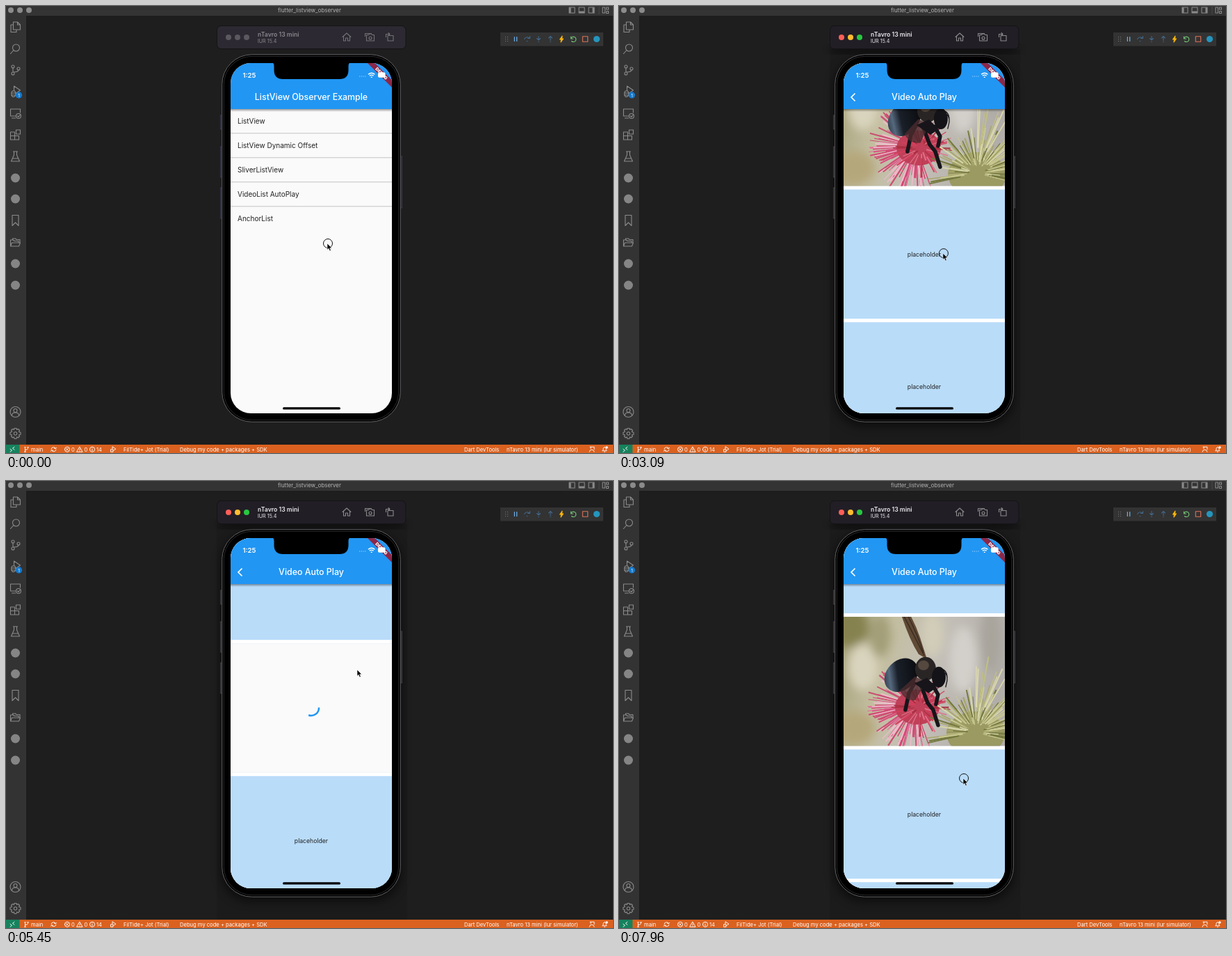
An HTML page for the animation above (8 s loop, 873 by 642 pixels).

```html
<!DOCTYPE html>
<html lang="en">
<head>
<meta charset="utf-8">
<title>Video list</title>
<style>
html, body { margin: 0; width: 100%; height: 100%; overflow: hidden; background: #1e1e1e; }
svg { display: block; width: 873px; height: 642px; font-family: Inter, Roboto, sans-serif; }
.ic { fill: none; stroke: #8a8a8a; stroke-width: 1.1; stroke-linejoin: round; stroke-linecap: round; }
.st { font-size: 7.6px; fill: #fff; }
.title { font-size: 12.4px; font-weight: 500; fill: #fff; text-anchor: middle; }
.row { font-size: 10px; fill: #222; }
.ph { font-size: 8.66px; fill: #222; text-anchor: middle; }
</style>
</head>
<body>
<svg viewBox="0 0 873 642">
  <defs>
    <clipPath id="screen"><rect x="323" y="82" width="232" height="503" rx="29"/></clipPath>
    <clipPath id="frame"><rect width="232" height="185.6"/></clipPath>
    <linearGradient id="shade" x2="0" y2="1">
      <stop stop-opacity=".38"/><stop offset="1" stop-opacity="0"/>
    </linearGradient>
    <linearGradient id="meadow" x2="1" y2=".2">
      <stop stop-color="#a29e76"/><stop offset=".3" stop-color="#c3bea0"/>
      <stop offset=".6" stop-color="#c4c0b8"/><stop offset="1" stop-color="#b1ada9"/>
    </linearGradient>
    <linearGradient id="shell" x2="1" y2=".6">
      <stop stop-color="#151a22"/><stop offset=".3" stop-color="#56697e"/>
      <stop offset=".5" stop-color="#1a2029"/><stop offset="1" stop-color="#0b0c10"/>
    </linearGradient>
    <filter id="soft" x="-40%" y="-40%" width="180%" height="180%"><feGaussianBlur stdDeviation="7"/></filter>
  </defs>

  <rect width="873" height="642" fill="#1e1e1e"/>
  <rect width="873" height="14" fill="#343435"/>
  <rect y="14" width="29" height="616" fill="#333"/>
  <g fill="#8b8b8b"><circle cx="7" cy="6" r="4"/><circle cx="20" cy="6" r="4"/><circle cx="33" cy="6" r="4"/></g>
  <text x="436.5" y="8.8" font-size="7.9" fill="#b4b4b4" text-anchor="middle">flutter_listview_observer</text>
  <g id="side"></g>
  <g id="tools"></g>

  <rect y="630" width="873" height="12" fill="#da611f"/>
  <rect y="630" width="19.5" height="12" fill="#16825d"/>
  <g id="status"></g>

  <g id="glow">
    <rect x="303" y="62" width="274" height="568" opacity=".1"/>
    <rect x="309" y="74" width="260" height="530" rx="42" filter="url(#soft)" opacity=".5"/>
    <rect x="306" y="58" width="266" height="8" filter="url(#soft)" opacity=".7"/>
  </g>
  <rect id="bar" x="303.5" y="28.5" width="271.5" height="33" rx="6" stroke="#111" stroke-width=".8"/>
  <g id="lights"><circle cx="320" cy="45" r="4"/><circle cx="333" cy="45" r="4"/><circle cx="346" cy="45" r="4"/></g>
  <g id="names">
    <text x="362" y="44.3" font-size="8.7" font-weight="600">nTavro 13 mini</text>
    <text x="362" y="53.2" font-size="7.2">lUR 15.4</text>
  </g>
  <g id="simIcons" class="ic"></g>

  <g id="keys" stroke-width=".7">
    <rect x="308.3" y="157" width="3" height="20"/><rect x="308.3" y="202" width="3" height="44"/>
    <rect x="308.3" y="261" width="3" height="44"/><rect x="566.7" y="216" width="3" height="74"/>
  </g>
  <rect x="310.7" y="69.7" width="256.6" height="527.6" rx="43" stroke="#626265"/>
  <rect x="313.3" y="72.3" width="251.4" height="522.4" rx="40.5" stroke="#29292b"/>

  <g clip-path="url(#screen)">
    <g id="home">
      <rect x="323" y="82" width="232" height="503" fill="#fafafa"/>
      <g id="rows"></g>
      <rect x="323" y="148" width="232" height="4" fill="url(#shade)"/>
      <rect x="323" y="82" width="232" height="66" fill="#2196f3"/>
      <text class="title" x="439" y="135.2">ListView Observer Example</text>
    </g>
    <g id="page">
      <rect x="323" y="82" width="232" height="503" fill="#fff"/>
      <g id="scroll">
        <g id="items"></g>
        <g id="cell">
          <rect width="232" height="185.6" fill="#fafafa"/>
          <path id="spin" fill="none" stroke="#2196f3" stroke-width="2.5"/>
          <g id="video" clip-path="url(#frame)"></g>
        </g>
      </g>
      <rect x="323" y="148" width="232" height="4" fill="url(#shade)"/>
      <rect x="323" y="82" width="232" height="66" fill="#2196f3"/>
      <path d="M339.5 125.5l-5.5 5.5 5.5 5.5" fill="none" stroke="#fff" stroke-width="1.7"/>
      <text class="title" x="439" y="135.2">Video Auto Play</text>
    </g>
    <g transform="translate(555 82) rotate(45)">
      <rect x="-26" y="17.3" width="52" height="7.5" fill="#8c2748"/>
    </g>
    <rect x="535" y="95.3" width="10.5" height="7.5" rx="2" fill="#fff"/>
    <text transform="translate(555 82) rotate(45)" y="23.4" font-size="6.3" font-weight="900" fill="#fff" text-anchor="middle">DEBUG</text>
    <text x="340.5" y="102.8" font-size="9.6" font-weight="600" fill="#fff">1:25</text>
    <path d="M508 101h10" stroke="#a9d5fa" stroke-width="1.2" stroke-dasharray="1.2 1.5"/>
    <g fill="none" stroke="#fff" stroke-width="1.4">
      <path d="M521 98.3q4.7-4 9.4 0M522.8 100.3q2.9-2.4 5.8 0"/><path d="M524.8 102.2h1.8"/>
    </g>
    <rect x="398" y="576.3" width="83" height="3.3" rx="1.65"/>
  </g>
  <path d="M381 81q4.5 0 4.5 5v6q0 13 13 13h81q13 0 13-13v-6q0-5 4.5-5z"/>

  <g id="cursor">
    <circle id="press" cx="1" r="6.5" fill="none" stroke="#111"/>
    <path d="M0 0v9.2l2.1-1.9 1.5 3.5 1.7-.7-1.5-3.4h2.9z" stroke="#fff" stroke-width=".6"/>
  </g>
</svg>

<script>
const $ = id => document.getElementById(id);
const LOOP = 8000, FIRST = 140, STEP = 147.2;
const PITCH = 190.6, HEIGHT = 185.6;

const icon = (x, y, d, extra = '') => `<path class="ic" transform="translate(${x} ${y})" d="${d}" ${extra}/>`;
const disc = (x, y, r, fill) => `<circle cx="${x}" cy="${y}" r="${r}" fill="${fill}"/>`;
const ring = r => `M${-r} 0a${r} ${r} 0 1 0 ${2 * r} 0a${r} ${r} 0 1 0 ${-2 * r} 0`;

// Editor chrome
$('side').innerHTML = [
  [30, 'M-3-7h6l4 4v7h-10zM-3-3h-3.5v10.5h8v-3.5M3-7v4h4'],
  [61, 'M-2.5 2.5l-4.5 5M-2.5 2.5a5 5 0 1 1 7 0a5 5 0 0 1-7 0'],
  [92, 'M-3.5-3v6M-5.5-5a2 2 0 1 0 4 0a2 2 0 1 0-4 0M-5.5 5a2 2 0 1 0 4 0a2 2 0 1 0-4 0M2.5-2a2 2 0 1 0 4 0a2 2 0 1 0-4 0M4.5 0q0 3-8 3'],
  [123, 'M-2-2v-6l9 6-7 5M-6 2h7M-6 5h7M-4-1h3q2 2 1.5 5t-3 3.5-3-3.5 1.5-5'],
  [154, 'M0 4h-7v-10h14v5M-5 7h5M1 4a3.5 3.5 0 1 0 7 0a3.5 3.5 0 1 0-7 0M3 4l1.5 1.5 2-3'],
  [185, 'M-7-4h6v11h-6zM-7 1.5h12v5.5h-6M5 1.5v5.5M1-7h6v6h-6z'],
  [216, 'M-3-7h6M-2-7v5l-4 9h12l-4-9v-5M-4 3h8'],
  [308, 'M-4.5-7.5h9v15l-4.5-4.5-4.5 4.5z'],
  [340, 'M-7 5v-9h4l1.5 1.5h6v2.5M-7 5l2-5h12l-2 5zM-4-4v-2h4l1.5 1.5h5v5'],
  [583, ring(7.5) + 'M-2.5-2a2.5 2.5 0 1 0 5 0a2.5 2.5 0 1 0-5 0M-5 5q0-4 5-4t5 4'],
  [614, ring(2.2) + 'M-1.5-7.5h3l.5 2 2-1 2 2-1 2 2.5 1v3l-2.5.5 1 2-2 2-2-1-.5 2.5h-3l-.5-2.5-2 1-2-2 1-2-2.5-.5v-3l2.5-1-1-2 2-2 2 1z']
].map(([y, d]) => icon(13.5, y, d)).join('')
  + [247, 277, 370, 401].map(y => disc(13.5, y, 6.5, '#858585')).join('')
  + disc(18.5, 128, 4.7, '#1378cc')
  + '<text x="18.5" y="130.5" font-size="6.5" fill="#fff" text-anchor="middle">1</text>';

const tool = (x, d, color, fill = 'none') => icon(x, 47.5, d, `style="stroke:${color};fill:${fill}"`);
$('tools').innerHTML = '<rect x="711" y="38" width="148" height="19.5" fill="#333"/>'
  + tool(720, 'M-1.5-3v0M1.5-3v0M-1.5 0v0M1.5 0v0M-1.5 3v0M1.5 3v0', '#888')
  + tool(733, 'M-1.7-3v6M1.7-3v6', '#75beff')
  + tool(749.5, 'M-4 0q3-5 8-1M4-4v3h-3M-.5 3h1', '#41678a')
  + tool(766, 'M0-4v5M-2.5-1l2.5 2.5 2.5-2.5M-.3 4h.6', '#41678a')
  + tool(783, 'M0 2v-6M-2.5-1.5l2.5-2.5 2.5 2.5M-.3 4h.6', '#41678a')
  + tool(799, 'M1-4.5l-3.5 5h2l-.5 4 3.5-5h-2z', '#fcb50a', '#fcb50a')
  + tool(816, 'M-3.5-3.5v3h3M-3.5-.5a3.7 3.7 0 1 1 1 3.5', '#75c878')
  + tool(833, 'M-3.7-3.7h7.4v7.4h-7.4z', '#e0735a')
  + disc(849.5, 47.5, 4.6, '#2595bd')
  + icon(814, 6, 'M-4-4h8v8h-8zM-3-3v6M-2-3v6')
  + icon(828, 6, 'M-4-4h8v8h-8zM-3 2h6M-3 3h6')
  + icon(842, 6, 'M-4-4h8v8h-8zM3-3v6M2-3v6')
  + '<path d="M853 1v11" stroke="#555" stroke-width=".7"/>'
  + icon(862, 6, 'M-4-4h3.5v8h-3.5zM1.5-4h3v3h-3zM1.5 1.5h3v3h-3z');

const white = 'style="stroke:#fff;stroke-width:.9"';
$('status').innerHTML = [
  [36, 'main'], [94, '0'], [112.5, '0'], [130, '14'], [169, 'FilTide+ Jot (Trial)'],
  [250, 'Debug my code + packages + SDK'], [659, 'Dart DevTools'], [720, 'nTavro 13 mini (lur simulator)']
].map(([x, s]) => `<text class="st" x="${x}" y="639.7">${s}</text>`).join('')
  + [
    [9, 'M-3-.5l2.5 2-2.5 2M3-3.5l-2.5 2 2.5 2'],
    [29.5, 'M-2-2v5M-3-3h2M2-2.5v1q0 2-4 2.5M1-3h2M-3 3.5h2'],
    [68.5, 'M-3.5-.5a3.5 3 0 0 1 6.5-1M3.5.5a3.5 3 0 0 1-6.5 1M4-2.5l-1 1.5-2-.5M-4 2.5l1-1.5 2 .5'],
    [88, ring(3.6) + 'M-1.5-1.5l3 3M1.5-1.5l-3 3'],
    [106, 'M0-3.5l4 7h-8zM0-1v2M0 2.3v.1'],
    [124, ring(3.6) + 'M0-.5v2.5M0-2v.1'],
    [154, 'M-1-1v-3l5 3.5-4 2.5M-3 0h3v3.5h-3z'],
    [842, 'M-3 3.5q.5-3 3.5-3t3.5 3M-2-3.5h6v3.5M-1-1v-2.5'],
    [861, 'M-3 2h6l-1-1.5v-2q-2-3.5-4 0v2zM-.5 3.5h1']
  ].map(([x, d]) => icon(x, 636.8, d, white)).join('')
  + disc(864, 634, 1.7, '#fff');

$('simIcons').innerHTML = [
  [490, 'M-6 0l6-5.5 6 5.5M-4.5-1v6.5h3v-4h3v4h3v-6.5'],
  [522.5, 'M-6-1v-4h9M-4-3h3l1-1.5h3l1 1.5h3v8.5h-11zM-.5 1.5a2 2 0 1 0 4 0a2 2 0 1 0-4 0'],
  [552, 'M-3-2h8v7.5h-8zM-5.5 0v-4h5M-2-6l2 2-2 2']
].map(([x, d]) => icon(x, 44.5, d)).join('');

// App content
$('rows').innerHTML = ['ListView', 'ListView Dynamic Offset', 'SliverListView', 'VideoList AutoPlay', 'AnchorList']
  .map((s, i) => `<text class="row" x="333" y="${169 + i * 35}">${s}</text>`
    + (i ? `<path d="M323 ${147.8 + i * 35}h232" stroke="#c3c3c3"/>` : '')).join('');

$('items').innerHTML = [0, 1, 2, 3, 4].map(i => `<g transform="translate(0 ${i * PITCH})">
  <rect width="232" height="${HEIGHT}" fill="#b9dcf9"/><text class="ph" x="116" y="96">placeholder</text></g>`).join('');

let seed = 7;
const rnd = (a, b) => a + (b - a) * ((seed = seed * 16807 % 2147483647) / 2147483647);
function spray(n, x, y, from, to, near, far, colors) {
  let out = '';
  for (let i = 0; i < n; i++) {
    const a = rnd(from, to) * Math.PI / 180, r = rnd(near, far);
    const at = k => `${(x + Math.cos(a) * k).toFixed(1)} ${(y + Math.sin(a) * k).toFixed(1)}`;
    out += `<path d="M${at(r * .35)}L${at(r)}" stroke="${colors[i % colors.length]}" stroke-width="${rnd(1, 2.2).toFixed(1)}"/>`;
  }
  return out;
}
$('video').innerHTML = `<rect width="232" height="186" fill="url(#meadow)"/>
  <g filter="url(#soft)">
    <ellipse cx="10" cy="15" rx="26" ry="30" fill="#86824f"/><ellipse cx="28" cy="72" rx="22" ry="34" fill="#d9d4bd"/>
    <ellipse cx="52" cy="28" rx="16" ry="30" fill="#a39f78"/><ellipse cx="128" cy="25" rx="16" ry="32" fill="#d2cdb8"/>
    <ellipse cx="172" cy="62" rx="20" ry="48" fill="#d3d0cb"/><ellipse cx="16" cy="160" rx="30" ry="25" fill="#b5a77b"/>
    <ellipse cx="212" cy="30" rx="14" ry="50" fill="#a8a49c"/>
  </g>
  <g id="plants">
    ${spray(100, 100, 125, 70, 240, 40, 70, ['#e0709a', '#d44a76', '#eebccb', '#c94f70'])}
    <ellipse cx="104" cy="128" rx="32" ry="25" fill="#bf4058"/>
    ${spray(60, 108, 128, 0, 360, 18, 46, ['#a82c3e', '#df7088', '#d23f5c'])}
    <ellipse cx="188" cy="166" rx="42" ry="32" fill="#9a9a62"/>
    ${spray(95, 188, 164, 165, 375, 30, 72, ['#d6d6aa', '#a7a66a', '#c9c891', '#74793f'])}
    ${spray(9, 188, 158, 270, 325, 78, 105, ['#dcd9ac', '#c0bf84'])}
  </g>
  <g id="bee">
    <g fill="none" stroke="#17151a" stroke-linecap="round" stroke-linejoin="round" stroke-width="5.5">
      <path d="M96 96l-8 14-5 24M106 100l9 24 8 10 7 22M122 98l8 14-3 14"/>
      <path d="M138 80q6 2 5 12l-2 9M134 75q10 2 9 16" stroke-width="1.3"/>
    </g>
    <g id="body">
      <path d="M76-6l12 0q10 18 16 36l10 31-12-7q-14-22-26-60z" fill="#604a35"/>
      <path d="M80-2q14 26 30 58M85-4q14 26 24 56" fill="none" stroke="#3b2c22" stroke-width="1.5"/>
      <ellipse cx="77" cy="84" rx="27" ry="21" transform="rotate(-45 77 84)" fill="url(#shell)"/>
      <path d="M75 106l22-20 16 8-16 26q-14 2-22-14z" fill="#4a2b2d" opacity=".8"/>
    </g>
    <ellipse cx="112" cy="75" rx="15" ry="17" fill="#2a2525"/>
    <ellipse cx="109" cy="70" rx="8" ry="7" fill="#54483f"/>
    <ellipse cx="131" cy="87" rx="10" ry="15" fill="#141317"/>
    <path d="M96 96l18-8 14 14-12 8z" fill="#17151a"/>
  </g>`;

// Timeline: rows of [time, ...values], linear in between
function track(rows, t) {
  let i = rows.findIndex(r => r[0] > t);
  if (i < 0) return rows[rows.length - 1].slice(1);
  if (!i) return rows[0].slice(1);
  const a = rows[i - 1], b = rows[i], k = (t - a[0]) / (b[0] - a[0]);
  return a.slice(1).map((v, j) => v + (b[j + 1] - v) * k);
}

const OFFSET = [[2680, 0], [2850, 30], [3050, 72], [3250, 87], [3450, 90.6], [4870, 90.6], [4997, 172.6],
  [5144, 257.6], [5295, 284], [5445, 296], [5600, 299.2], [6560, 299.2], [6760, 250], [6911, 208.6],
  [7060, 170], [7210, 150], [7350, 144], [7500, 143.1]];
const POINTER = [[0, 462, 341], [400, 462, 341], [900, 462, 271], [1250, 462, 271], [1900, 462, 450],
  [2600, 462, 450], [3100, 466, 352], [3350, 466, 350], [3950, 488, 472], [4400, 488, 472], [4870, 491, 462],
  [4997, 494, 365], [5144, 500, 282], [5300, 505, 271], [6450, 505, 271], [6911, 494, 395],
  [7060, 494, 432], [7400, 494, 440], [7800, 495, 427]];
const PRESS = [[0, 280], [1020, 1250], [2640, 3200], [4860, 5140], [6480, 7000], [7780, 8000]];
// [load time, item, video start]
const PLAY = [[0, 0, 2000], [3150, 1, 3500], [5140, 2, 5850], [6880, 1, 7090]];
// video time, bee x, y, body turn, plants x, y
const POSE = [[200, 0, 0, 0, 0, 0], [620, 3, -7, 0, 0, -3], [860, 6, 0, 0, 2, 2], [1490, 14, 6, -15, 8, 5]];

const move = (id, x, y) => $(id).setAttribute('transform', `translate(${x} ${y})`);
const show = (id, on) => $(id).setAttribute('visibility', on ? 'inherit' : 'hidden');

function windowState(active) {
  show('glow', active);
  $('bar').setAttribute('fill', active ? '#221e26' : '#2c2932');
  $('names').setAttribute('fill', active ? '#e8e6ea' : '#89868d');
  $('simIcons').setAttribute('opacity', active ? 1 : .75);
  $('keys').setAttribute('fill', active ? '#2b2b2d' : '#272536');
  $('keys').setAttribute('stroke', active ? '#48484a' : '#454258');
  const colors = active ? ['#fe5f57', '#febc2e', '#28c840'] : Array(3).fill('#5b585f');
  [...$('lights').children].forEach((c, i) => c.setAttribute('fill', colors[i]));
}

function spinner(age) {
  const sweep = .22 + 4.2 * Math.sin(Math.min(age, 1333) / 1333 * Math.PI) ** 2;
  const start = -1.25 + age * .004, end = start + sweep;
  const pt = a => `${116 + 11 * Math.cos(a)} ${92.8 + 11 * Math.sin(a)}`;
  $('spin').setAttribute('d', `M${pt(start)}A11 11 0 ${sweep > Math.PI ? 1 : 0} 1 ${pt(end)}`);
}

function draw(ms) {
  const t = ms < FIRST ? 0 : FIRST + Math.floor((ms - FIRST) / STEP) * STEP;
  windowState(t >= FIRST);

  const p = Math.min(1, Math.max(0, (t - 1400) / 400)), slide = 1 - (1 - p) ** 3;
  move('home', -77 * slide, 0);
  move('page', 232 * (1 - slide), 0);
  show('page', p > 0);

  move('scroll', 323, 147.5 - track(OFFSET, t)[0]);
  const [load, item, start] = PLAY.filter(r => r[0] <= t).pop();
  move('cell', 0, item * PITCH);
  show('video', t >= start);
  spinner(Math.max(0, t - Math.max(load, 1480)));
  const [bx, by, turn, px, py] = track(POSE, t - start);
  move('bee', bx, by);
  move('plants', px, py);
  $('body').setAttribute('transform', `rotate(${turn} 112 70)`);

  move('cursor', ...track(POINTER, t));
  show('press', PRESS.some(([a, b]) => t >= a && t < b));
}

function tick(now) {
  draw(now % LOOP);
  requestAnimationFrame(tick);
}
draw(0);
requestAnimationFrame(tick);
</script>
</body>
</html>
```
